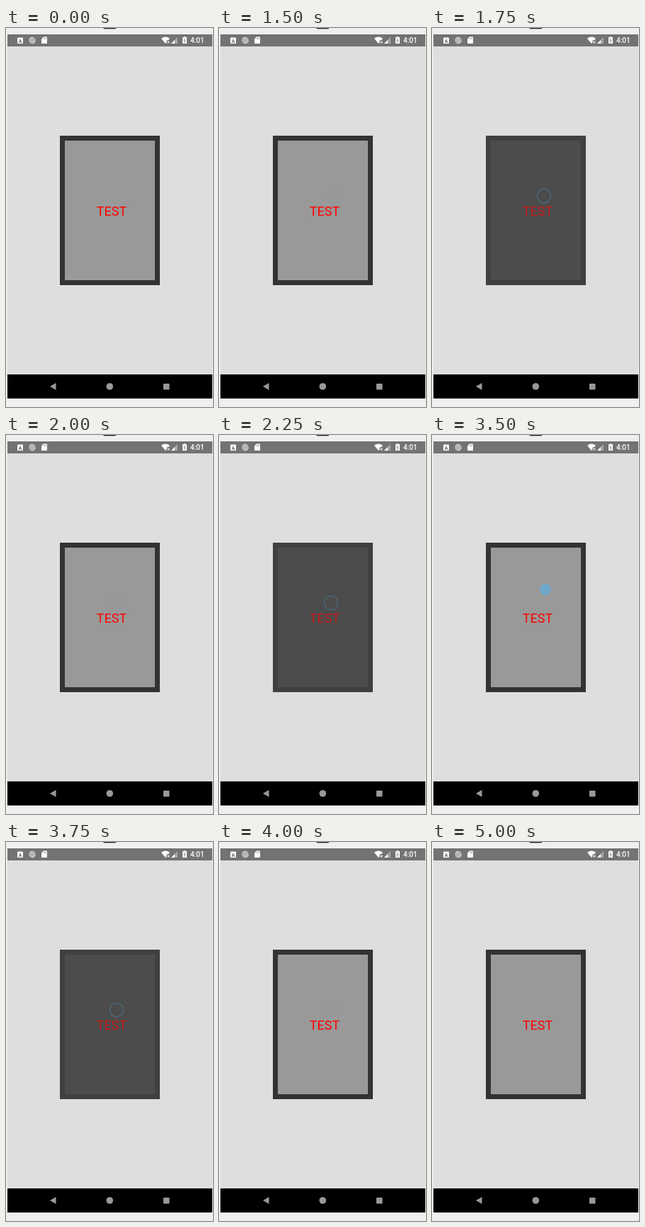
These frames come from a looping animation (292x535 px, 5500 ms). An HTML page:

```html
<!DOCTYPE html>
<html lang="en">
<head>
<meta charset="utf-8">
<title>Press test</title>
<style>
  html, body { margin: 0; width: 100%; height: 100%; overflow: hidden; background: #efefef; }
  svg { display: block; width: 292px; height: 535px; }
  text { font-family: Roboto, sans-serif; }
</style>
</head>
<body>
<svg viewBox="0 0 292 535">
  <rect x="137" y="-4" width="18.5" height="5.2" rx="2" fill="#222"/>
  <rect x="2" y="9" width="289" height="17" fill="#737373"/>
  <rect x="2" y="26" width="289" height="463" fill="#dedede"/>
  <rect x="2" y="489" width="289" height="34" fill="#000"/>

  <g fill="#fff">
    <rect x="16" y="13.5" width="8" height="8.5" rx="1"/>
    <text x="20" y="20.5" font-size="7" font-weight="700" text-anchor="middle" fill="#666">A</text>
    <circle cx="37" cy="17.5" r="4.8" fill="#b5b5b5"/>
    <path d="M33.2 15.5A4.3 4.3 0 0 1 38 13.3M36 21.7A4.3 4.3 0 0 0 41.2 18" fill="none" stroke="#dadada"/>
    <path d="M53 12.5h4.3q.7 0 .7.7v8.1q0 .7-.7.7h-6.6q-.7 0-.7-.7v-5.8z"/>
    <path d="M53.5 14v1.8M55 14v1.8M56.5 14v1.8" stroke="#737373" stroke-width=".7"/>
    <path d="M219 14.8Q225 10.4 231 14.8L229 17.3H226.5V20.5L225 22z"/>
    <path d="M227.6 18.6l3 3m0-3l-3 3" stroke="#fff"/>
    <path d="M242 12.8V22h-9z" fill="#a6a6a6"/>
    <path d="M238 16.9V22h-5z"/>
    <path d="M251 12h2v1h2v9h-6v-9h2z"/>
    <path d="M252.6 14.5l-1.8 3.4h2.4l-1.8 3" fill="none" stroke="#737373" stroke-width=".8"/>
    <text x="260" y="21.3" font-size="10" font-weight="500">4:01</text>
  </g>

  <g fill="#999">
    <path d="M62 506l8.5-5v10z"/>
    <circle cx="146.3" cy="506" r="4.8"/>
    <rect x="222" y="502" width="8.5" height="8.5" rx=".7"/>
  </g>

  <rect id="border" x="76" y="152" width="141" height="211"/>
  <rect id="panel" x="83" y="159" width="127" height="197"/>
  <text id="label" x="149" y="265" font-size="18" text-anchor="middle">TEST</text>
  <circle id="dot" r="8" fill="#70a8ca"/>
  <circle id="ring" r="9.6" fill="none" stroke-width="1.4"/>
</svg>
<script>
  const LOOP = 5500;
  const [border, panel, label, dot, ring] =
    ['border', 'panel', 'label', 'dot', 'ring'].map(id => document.getElementById(id));

  // Start time, pointer shape, x, y, pressed
  const steps = [
    [0],
    [750, dot, 163, 180],
    [1000, dot, 175, 229],
    [1250, ring, 172, 248],
    [1500, ring, 162, 238],
    [1750, ring, 158, 237, true],
    [2000, ring, 158, 237],
    [2250, ring, 158, 237, true],
    [2500, ring, 158, 237],
    [3250],
    [3500, dot, 160, 218],
    [3750, ring, 156, 237, true],
    [4000, ring, 156, 237],
    [5000]
  ];

  function draw(now) {
    const t = now % LOOP;
    const [, shape, x, y, pressed] = steps.findLast(s => s[0] <= t);
    border.setAttribute('fill', pressed ? '#404040' : '#333');
    panel.setAttribute('fill', pressed ? '#4c4c4c' : '#999');
    label.setAttribute('fill', pressed ? '#c41a1a' : '#f00');
    ring.setAttribute('stroke', pressed ? '#4c6a7a' : '#8f9b9f');
    for (const pointer of [dot, ring]) {
      pointer.setAttribute('visibility', pointer === shape ? 'visible' : 'hidden');
    }
    if (shape) {
      shape.setAttribute('cx', x);
      shape.setAttribute('cy', y);
    }
    requestAnimationFrame(draw);
  }
  draw(0);
</script>
</body>
</html>
```
